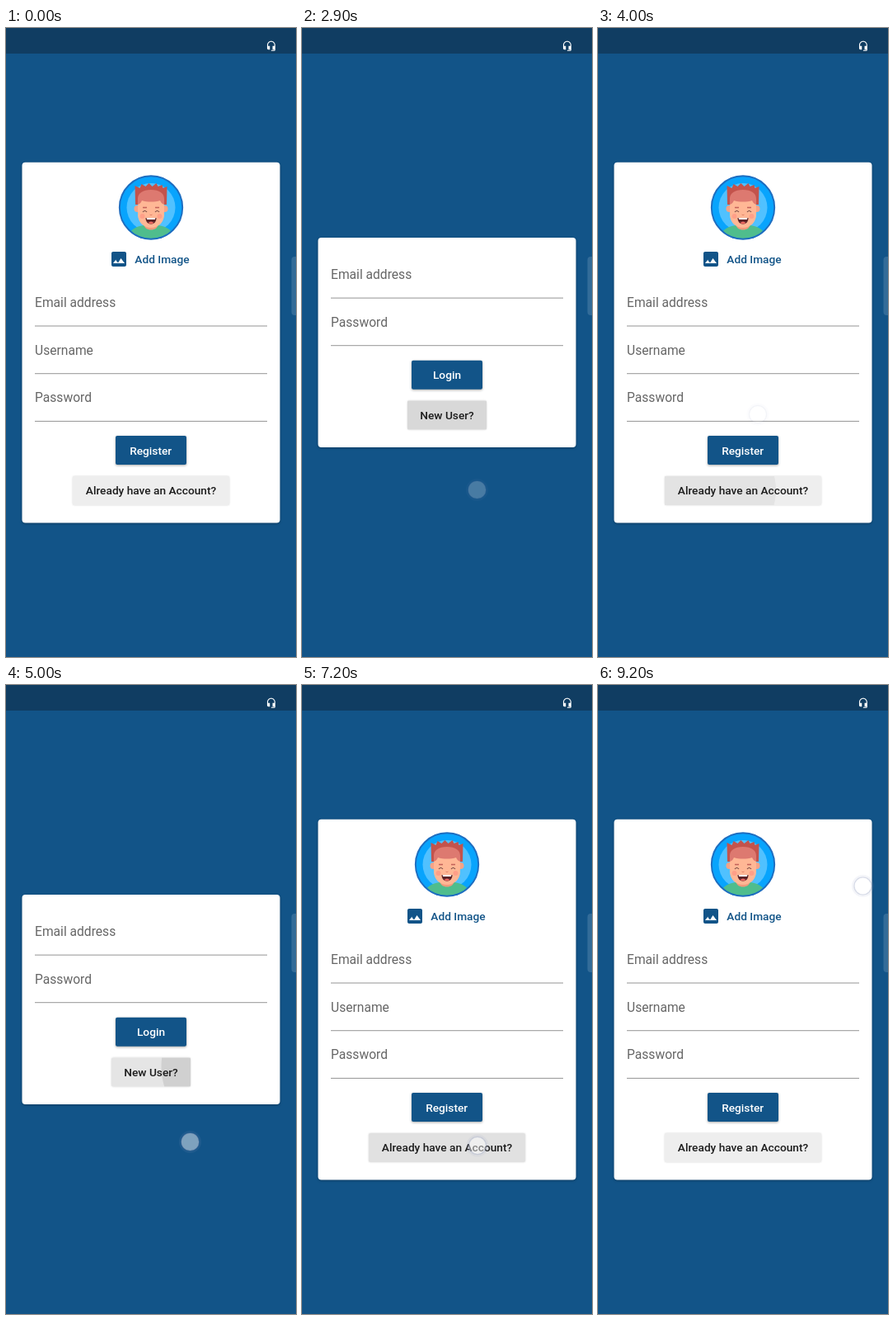
Write an HTML page that moves like this. It is 352 px wide and 762 px high and loops after 9300 ms.

```html
<!DOCTYPE html>
<html lang="en">
<head>
<meta charset="utf-8">
<title>Register and login</title>
<style>
  html, body { margin: 0; width: 100%; height: 100%; overflow: hidden; background: #125488; }
  svg { display: block; }
  text { font: 500 13.69px Roboto, sans-serif; }
  .label { font-weight: 400; font-size: 15.64px; fill: #666; }
  .mid { text-anchor: middle; }
  .card { fill: #fff; filter: drop-shadow(0 1px 1.5px rgba(0, 0, 0, .3)); }
  .main { fill: #125488; filter: drop-shadow(0 1.5px 1.5px rgba(0, 0, 0, .35)); }
  .plain { fill: #eee; filter: drop-shadow(0 .5px 1px rgba(0, 0, 0, .16)); }
  .line { fill: #949494; }
  .blue { fill: #125488; }
  .white { fill: #fff; }
  .dark { fill: #1c1c1c; }
</style>
</head>
<body>
<svg width="352" height="762" viewBox="0 0 352 762">
  <defs>
    <clipPath id="disc"><circle cx="176" cy="217.5" r="38"/></clipPath>
  </defs>
  <rect width="352" height="762" fill="#125488"/>
  <rect width="352" height="31" fill="#103d62"/>
  <path transform="translate(315.3 15.2) scale(.55)" fill="#fff" d="M12 1c-4.97 0-9 4.03-9 9v7c0 1.66 1.34 3 3 3h3v-8H5v-2c0-3.87 3.13-7 7-7s7 3.13 7 7v2h-4v8h4v1h-7v2h6c1.66 0 3-1.34 3-3V10c0-4.97-4.03-9-9-9z"/>
  <rect x="346.5" y="277" width="12" height="71" rx="4" fill="#fff" opacity=".14"/>

  <g id="register">
    <rect class="card" x="19.5" y="162.8" width="313" height="436.6" rx="4"/>
    <g clip-path="url(#disc)">
      <circle cx="176" cy="217.5" r="39" fill="#08a4fd"/>
      <circle cx="176" cy="217.5" r="29.5" fill="#50c1ff"/>
      <path d="M148 258c0-13 8-17 19-19h18c11 2 19 6 19 19z" fill="#4fbd8d"/>
      <path d="M168 232h16v8c-2 6-14 6-16 0z" fill="#f09a7c"/>
      <path d="M157 214l-.5-23 6 3 2-5 5 3 4-4 4 4 5-4 2 4 5-2 1 4 5-2-.5 22z" fill="#c3534c"/>
      <circle cx="159.5" cy="219" r="4" fill="#f7a386"/>
      <circle cx="192.500" cy="219" r="4" fill="#f7a386"/>
      <path d="M160 209h32v17c0 9-7 16-16 16s-16-7-16-16z" fill="#ffb795"/>
      <path d="M160 214v-7c0-7 6-11 16-11s16 4 16 11v7c-3-1-4-3-5-5-6 2-16 2-22 0-1 2-2 4-5 5z" fill="#dd7970"/>
      <path d="M166 217.500h5M181 217.500h5" stroke="#c3625a" stroke-width="1.300"/>
      <path d="M166 223q2.500-3 5 0M181 223q2.500-3 5 0" fill="none" stroke="#70443f" stroke-width="1.100"/>
      <circle cx="165.500" cy="228" r="3" fill="#ff9f88"/>
      <circle cx="186.500" cy="228" r="3" fill="#ff9f88"/>
      <path d="M174.500 226q1.500 1.500 3 0" fill="none" stroke="#e48469"/>
      <path d="M169.500 230h13c0 5-3 7.500-6.500 7.500s-6.500-2.500-6.500-7.500z" fill="#5d2428"/>
      <path d="M170.500 230h11l-.7 2h-9.600z" fill="#fff"/>
      <path d="M172.500 236q3.500-3 7 0-3.500 2.500-7 0z" fill="#ec665f"/>
    </g>
    <circle cx="176" cy="217.5" r="38.2" fill="none" stroke="#1d6dc0" stroke-width="1.9"/>
    <path class="blue" transform="translate(125 268)" d="M21 19V5c0-1.1-.9-2-2-2H5c-1.100 0-2 .9-2 2v14c0 1.100.9 2 2 2h14c1.100 0 2-.9 2-2zM8.500 13.500l2.500 3.010L14.500 11l4.500 6H5l3.500-4.500z"/>
    <text class="blue" x="156.3" y="285">Add Image</text>
    <text class="label" x="35" y="338">Email address</text>
    <rect class="line" x="35" y="360.500" width="282" height="1"/>
    <text class="label" x="35" y="395.700">Username</text>
    <rect class="line" x="35" y="418.200" width="282" height="1"/>
    <text class="label" x="35" y="453.300">Password</text>
    <rect class="line" x="35" y="475.900" width="282" height="1"/>
    <rect class="main" x="133" y="494" width="86" height="35" rx="2"/>
    <text class="white mid" x="175.700" y="516.500">Register</text>
    <rect class="plain" x="81" y="543" width="190" height="35" rx="2"/>
    <svg x="81" y="543" width="190" height="35">
      <rect class="focus" width="190" height="35" rx="2"/>
      <circle class="ripple"/>
    </svg>
    <text class="dark mid" x="176" y="565.300">Already have an Account?</text>
  </g>

  <g id="login">
    <rect class="card" x="19.5" y="254" width="313" height="254" rx="4"/>
    <text class="label" x="35" y="304">Email address</text>
    <rect class="line" x="35" y="326.600" width="282" height="1"/>
    <text class="label" x="35" y="361.700">Password</text>
    <rect class="line" x="35" y="384.200" width="282" height="1"/>
    <rect class="main" x="133" y="402.700" width="86" height="35" rx="2"/>
    <text class="white mid" x="176" y="425.200">Login</text>
    <rect class="plain" x="128" y="451.400" width="96" height="35" rx="2"/>
    <svg x="128" y="451.400" width="96" height="35">
      <rect class="focus" width="96" height="35" rx="2"/>
      <circle class="ripple"/>
    </svg>
    <text class="dark mid" x="176" y="474">New User?</text>
  </g>

  <g id="touch">
    <circle r="12.500" fill="none" stroke="#8f9fc8" stroke-opacity=".1" stroke-width="2"/>
    <circle r="10.600" fill="#fff" fill-opacity=".46" stroke="#8c98bc" stroke-opacity=".34" stroke-width="1.400"/>
  </g>
</svg>
<script>
  const LOOP = 9300, STEP = 100;
  const taps = [
    { x: 212.5, y: 559.5, down: 2500, ripple: 2600, swap: 2700, up: 2800 },
    { x: 194, y: 468, down: 3700, ripple: 3862, swap: 3900, up: 3860 },
    { x: 223.5, y: 553.5, down: 4800, ripple: 4836, swap: 4900, up: 5000 },
    { x: 202, y: 473, down: 5700, ripple: 5888, swap: 5900, up: 5860 },
    { x: 213, y: 558, down: 7200, ripple: 7240, swap: 7300, up: 7300 },
    { x: 188, y: 461, down: 7900, ripple: 7990, swap: 8100, up: 8100 },
    { x: 321.5, y: 243.5, down: 9100, up: 9300 }
  ];
  const screens = ['register', 'login'].map(id => document.getElementById(id));
  const corners = [[81, 543], [128, 451.4]];
  const ripples = document.querySelectorAll('.ripple');
  const focuses = document.querySelectorAll('.focus');
  const touch = document.getElementById('touch');
  const clamp = v => Math.max(0, Math.min(1, v));

  function draw(t) {
    const shown = taps.filter(p => t >= p.swap).length % 2;
    screens.forEach((s, i) => s.setAttribute('visibility', i === shown ? 'visible' : 'hidden'));

    const index = taps.findLastIndex(p => t >= p.down);
    const tap = taps[index];
    touch.setAttribute('opacity', tap ? clamp(1 - (t - tap.up) / 200) : 0);
    if (tap) touch.setAttribute('transform', `translate(${tap.x} ${tap.y})`);

    // The wave keeps its place inside the button when the screen changes.
    const live = tap && t >= tap.ripple;
    const [left, top] = corners[index % 2] || [0, 0];
    ripples.forEach(r => {
      r.setAttribute('r', live ? Math.min(200, (t - tap.ripple) / 2) : 0);
      r.setAttribute('opacity', live ? .09 * clamp(1 - (t - tap.up) / 300) : 0);
      if (live) {
        r.setAttribute('cx', tap.x - left);
        r.setAttribute('cy', tap.y - top);
      }
    });
    focuses[0].setAttribute('opacity', t >= 5900 && t < 7300 ? .055 : 0);
    focuses[1].setAttribute('opacity', .04);
  }

  function tick() {
    draw(Math.floor((performance.now() + 8) / STEP) * STEP % LOOP);
    requestAnimationFrame(tick);
  }
  tick();
</script>
</body>
</html>
```
